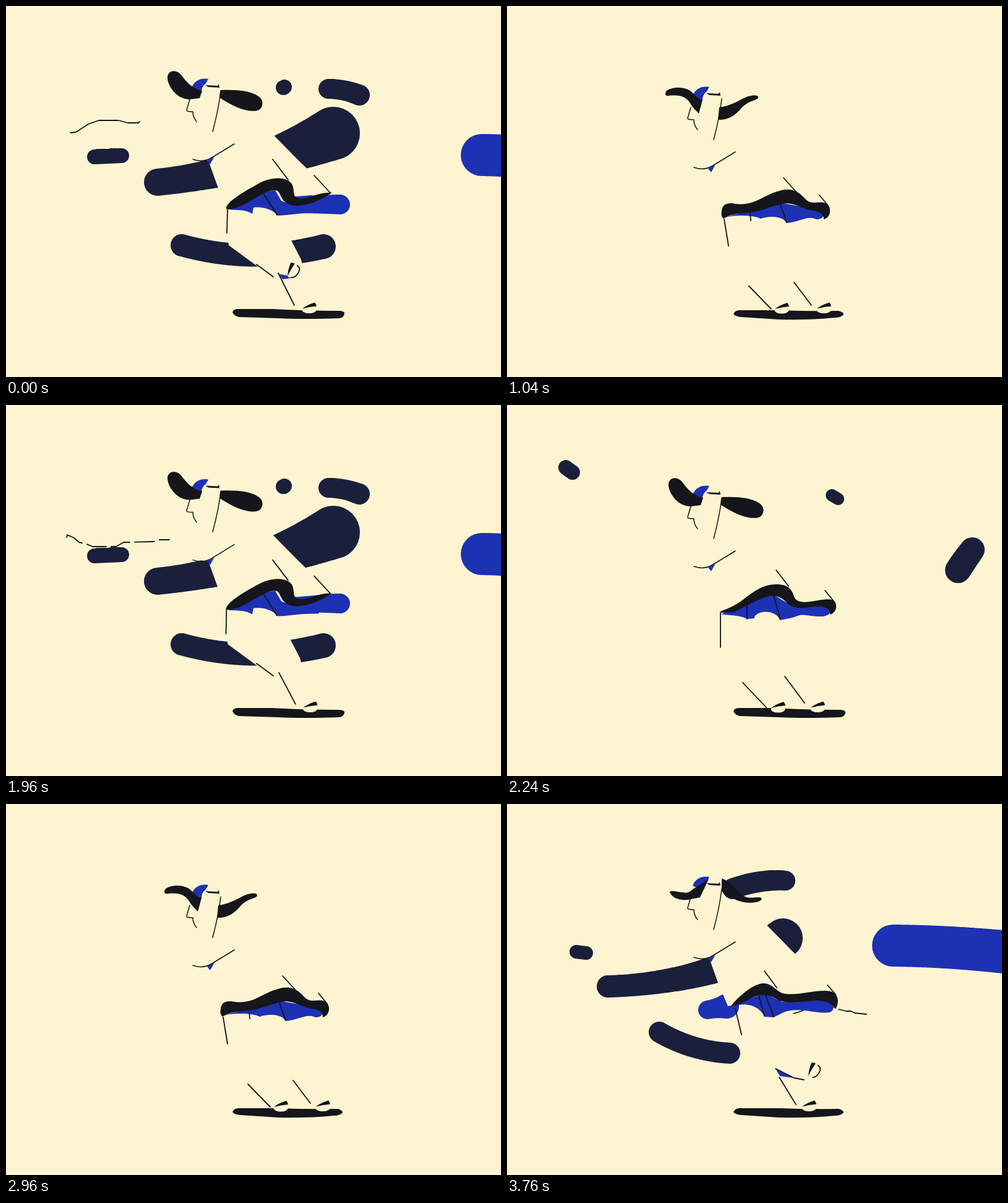
Recreate the animation shown at these times as an HTML page with a canvas. Size 800 by 600 pixels, loop 3.8 s.

```html
<!DOCTYPE html>
<html lang="en">
<head>
<meta charset="utf-8">
<title>Skater</title>
<style>
html, body { margin: 0; height: 100%; overflow: hidden; background: #fff4d1; }
canvas { display: block; }
</style>
</head>
<body>
<canvas id="stage" width="800" height="600"></canvas>
<script>
const ctx = document.getElementById('stage').getContext('2d');
const CREAM = '#fff4d1', NAVY = '#1a203b', BLUE = '#1d31b5', INK = '#15151b';
const STEP = 40, LOOP = 3800, CYCLE = 48;

// Value of keys [[step, ...numbers], ...] at a step, or null outside them.
function at(keys, step) {
  const i = keys.findIndex((k, n) => n + 1 < keys.length && step >= k[0] && step <= keys[n + 1][0]);
  if (i < 0) return null;
  const a = keys[i], b = keys[i + 1], p = (step - a[0]) / (b[0] - a[0]);
  return a.slice(1).map((v, n) => v + (b[n + 1] - v) * p);
}
const cyclic = (keys, step) => at(keys, step) || at(keys, step + CYCLE);

function fill(path, color) {
  ctx.fillStyle = color;
  ctx.fill(new Path2D(path));
}
function line(path, width = 1.8) {
  ctx.strokeStyle = INK;
  ctx.lineWidth = width;
  ctx.stroke(new Path2D(path));
}
const segment = s => s && line(`M${s[0]} ${s[1]}L${s[2]} ${s[3]}`);
function shifted(dx, dy, draw) {
  ctx.save();
  ctx.translate(dx, dy);
  draw();
  ctx.restore();
}

// Gusts: step, tail x y r, bend x y, head x y r
const gusts = [
  [NAVY, [[38, 70, 300, 0, 75, 300, 80, 300, 0], [41, 85, 299, 13, 120, 305, 170, 292, 16],
    [46, 163, 295, 18, 330, 290, 446, 217, 32], [48, 245, 285, 22, 390, 270, 529, 206, 43],
    [52, 570, 255, 28, 640, 240, 700, 225, 36], [56, 729, 267, 21, 740, 250, 752, 234, 20],
    [59, 785, 215, 0, 785, 215, 785, 215, 0]]],
  [NAVY, [[39, 110, 310, 0, 115, 315, 120, 320, 0], [46, 246, 369, 17, 300, 400, 360, 403, 17],
    [48, 284, 387, 18, 395, 418, 513, 389, 20], [54, 700, 350, 0, 710, 350, 720, 350, 0]]],
  [NAVY, [[34, 98, 165, 0, 98, 165, 98, 165, 0], [36, 108, 184, 14, 115, 196, 122, 209, 15],
    [46, 365, 137, 17, 410, 121, 450, 124, 16], [48, 521, 134, 16, 545, 134, 571, 144, 17],
    [53, 770, 190, 0, 770, 190, 770, 190, 0]]],
  [NAVY, [[45, 400, 132, 0, 400, 132, 400, 132, 0], [48, 448, 132, 12, 449, 132, 450, 131, 12],
    [56, 525, 146, 10, 530, 149, 535, 152, 10], [60, 590, 175, 0, 590, 175, 590, 175, 0]]],
  [NAVY, [[44, 105, 238, 0, 105, 238, 105, 238, 0], [46, 112, 239, 11, 120, 240, 128, 241, 11],
    [48, 143, 244, 12, 165, 243, 187, 242, 12], [53, 400, 240, 0, 405, 240, 410, 240, 0]]],
  [NAVY, [[6, 92, 99, 0, 92, 99, 92, 99, 0], [8, 95, 101, 12, 100, 105, 106, 109, 12],
    [16, 446, 221, 16, 480, 226, 522, 223, 16], [22, 770, 190, 0, 775, 190, 780, 190, 0]]],
  [NAVY, [[18, 80, 130, 0, 80, 130, 80, 130, 0], [20, 82, 130, 13, 95, 132, 112, 136, 13],
    [22, 330, 180, 16, 410, 190, 500, 185, 16], [25, 790, 200, 0, 790, 200, 790, 200, 0]]],
  [BLUE, [[28, 20, 330, 0, 20, 330, 20, 330, 0], [30, 90, 335, 14, 140, 340, 190, 330, 14],
    [34, 740, 290, 0, 745, 290, 750, 290, 0]]],
  [BLUE, [[34, -160, 140, 25, -110, 140, -60, 160, 20], [36, -80, 172, 25, 35, 170, 111, 251, 23],
    [40, 0, 20, 24, 100, 260, 420, 220, 30], [46, 624, 229, 34, 740, 230, 880, 248, 36],
    [48, 769, 241, 34, 840, 242, 920, 255, 36], [51, 960, 255, 34, 970, 255, 980, 255, 36]]],
  [BLUE, [[33, 20, 325, 0, 20, 325, 20, 325, 0], [36, 41, 334, 16, 60, 335, 79, 337, 16],
    [46, 324, 333, 15, 340, 330, 355, 327, 20], [48, 470, 321, 14, 500, 321, 540, 321, 16],
    [54, 730, 300, 0, 730, 300, 730, 300, 0]]]
];

function drawGust(color, keys, step) {
  const g = cyclic(keys, step);
  if (!g) return;
  const [x0, y0, r0, bx, by, x1, y1, r1] = g;
  ctx.fillStyle = color;
  ctx.beginPath();
  for (let i = 0; i <= 100; i++) {
    const p = i / 100, q = 1 - p;
    const x = q * q * x0 + 2 * p * q * bx + p * p * x1;
    const y = q * q * y0 + 2 * p * q * by + p * p * y1;
    const r = r0 + (r1 - r0) * p * p;
    ctx.moveTo(x + r, y);
    ctx.arc(x, y, r, 0, 7);
  }
  ctx.fill();
}

// Four flapping drawings: left hair, right hair
const hair = [
  ['M317 137C300 133 292 123 285 114C277 102 263 103 261 114C260 128 275 151 297 151L313 149Z',
    'M347 136C375 135 395 137 408 146C417 152 416 163 409 168C395 174 370 165 345 148Z'],
  ['M316 139C308 137 303 130 296 124C285 117 267 118 258 124C253 131 258 133 262 132C282 130 290 135 296 144C300 152 306 156 310 161Z',
    'M343 151C365 148 378 137 390 133C398 131 407 130 406 136C400 141 390 140 378 153C368 165 356 172 341 171Z'],
  ['M317 129C300 126 282 127 269 139C262 146 262 160 270 162C284 164 296 152 313 153Z',
    'M345 143C366 145 376 131 390 125C402 120 413 123 411 134C407 148 390 162 375 161C363 161 353 157 344 154Z'],
  ['M326 121L300 138C294 144 290 144 284 143C275 142 266 139 263 142C266 152 278 156 292 155L312 151Z',
    'M347 120C362 126 372 143 385 150C395 154 409 148 412 153C410 161 385 162 370 155C358 149 350 145 347 141Z']
];

// Shirt hem: height of the body it belongs to, lining, band, creases
const hemPush = [0,
  'M360 329C385 320 410 300 435 298L445 315L465 323L520 306L505 335C480 334 460 338 440 339C430 328 412 324 400 326L398 336C385 328 372 331 360 329Z',
  'M356 328C354 318 385 300 405 289C430 274 457 276 463 290C467 300 462 309 474 311C490 313 505 300 527 302C510 313 490 323 468 323C446 321 446 308 440 300C430 292 405 310 390 318C376 326 360 331 356 328Z',
  'M431 248L456 281M498 274L524 302M416 303L438 338'];
const hems = [
  [13,
    'M346 338C370 330 400 310 430 306L460 325L515 322C528 328 526 340 510 342C490 343 480 337 470 341C460 345 450 346 441 348C436 333 410 330 400 342L400 345L388 346C375 339 360 341 346 338Z',
    'M344 336C345 331 358 332 380 316C400 300 415 290 435 290C452 290 459 296 463 307C466 318 474 320 490 318C505 316 520 312 528 316C535 322 533 336 522 339C524 330 512 324 495 326C478 329 462 330 452 320C445 311 432 306 420 310C400 316 380 330 365 335Z',
    'M435 267L455 293M514 300L527 316M388 323L388 346M431 308L442 347'],
  [13,
    'M350 343C370 334 400 334 440 318L480 325L505 330C514 335 514 345 500 345C485 338 472 350 452 351C445 338 420 340 410 344C400 338 365 337 350 343Z',
    'M347 332C347 320 358 317 370 320C400 324 415 305 440 299C462 292 474 303 482 312C492 322 500 316 512 318C526 321 525 342 512 345C512 332 500 332 488 330C470 324 460 317 445 320C420 326 405 334 385 335C368 336 358 338 350 344C346 340 346 336 347 332Z',
    'M447 278L477 311M505 306L519 323M393 336L394 347M441 319L452 350'],
  [10,
    'M356 340C368 322 390 328 402 335L450 323C480 316 497 333 500 345C485 351 465 350 455 345C448 330 430 340 418 347L400 347C390 330 372 332 356 340Z',
    'M354 334C355 320 368 307 384 310C400 314 410 323 425 319C445 312 458 301 478 302C494 305 505 317 516 334C514 340 508 343 500 344C490 333 470 320 455 324C435 330 420 337 405 335C388 330 370 322 356 338Z',
    'M469 283L492 306M381 299L388 309M399 337L401 350M448 327L457 346'],
  [0,
    'M364 328C380 322 400 308 420 308L445 320L500 316C525 316 535 330 522 337C500 340 470 327 447 337L431 345L416 344C410 330 390 318 364 328Z',
    'M361 328C368 318 390 296 408 291C425 286 432 300 445 306C465 311 490 302 515 302C535 302 539 318 531 332C528 326 520 318 500 318C480 318 460 324 440 318C425 308 410 306 395 314C385 320 370 326 361 328Z',
    'M416 270L436 297M518 293L531 308M407 310L416 343M418 309L431 344']
];

const boards = [
  'M366 495Q368 490 375 490L430 490Q480 493 540 493Q548 494 547 498Q545 505 538 505Q480 507 440 505L376 503Q368 501 366 495Z',
  'M366 498Q369 491 378 492L440 492Q490 494 536 493Q544 495 544 499Q540 504 530 504Q490 508 440 507L378 503Q368 502 366 498Z'
];

const bodyDrop = [[0, 0], [5, 13], [34, 13], [46, 0], [48, 0]];
const knee = [[0, 358, 328, 357, 367], [8, 345, 337, 345, 392], [17, 349, 339, 353, 385],
  [26, 351, 345, 358, 388], [37, 355, 340, 363, 377], [46, 369, 331, 379, 373], [48, 358, 328, 357, 367]];
const standShin = [[0, 440, 432, 466, 484], [8, 449, 439, 481, 482], [17, 457, 439, 488, 486],
  [26, 464, 447, 492, 484], [37, 470, 447, 498, 487], [46, 440, 442, 467, 486], [48, 440, 432, 466, 484]];
const pushShin = [[48, 405, 418, 432, 438], [50, 405, 418, 432, 438], [56, 381, 449, 419, 489],
  [65, 390, 454, 424, 490], [74, 391, 453, 427, 490], [85, 400, 455, 433, 490], [88, 425, 450, 462, 492]];
const standFoot = [[0, 490], [8, 502], [17, 507], [26, 512], [37, 516], [46, 488], [48, 490]];
const pushFoot = [[5, 430, 470, -20], [8, 438, 491, 0], [17, 441, 491, 0], [26, 444, 491, 0], [37, 452, 491, 0],
  [40, 495, 494, -5], [43, 540, 462, -50], [46, 495, 432, -50], [48, 463, 429, -50]];
const cuff = [[45, 434, 428, 441, 440, 464, 443], [46, 434, 428, 441, 440, 464, 443], [48, 440, 433, 447, 442, 468, 439]];

function drawFoot(x, y, degrees) {
  ctx.save();
  ctx.translate(x, y);
  ctx.rotate(degrees * Math.PI / 180);
  ctx.fillStyle = CREAM;
  ctx.beginPath();
  ctx.ellipse(0, 1, 11.5, 5.5, 0, 0, 7);
  ctx.fill();
  if (degrees) line('M12 0C13 11 -4 11 -8 6');
  fill('M-11 -1Q-4 -7 9 -11Q11 -9 12 -5Q0 -4 -11 -1Z', INK);
  ctx.restore();
}

function drawHead(d) {
  fill('M300 132C305 120 315 116 327 118L323 125C318 129 316 133 316 140Z', BLUE);
  hair[d].forEach(path => fill(path, INK));
  fill('M322 128L342 129L344 126L345 132L327 131Z', INK);
  line('M297 151L292 168Q291 171 302 171Q302 180 308 187M347 137Q344 165 334 203', 1.5);
  line('M302 248Q318 254 333 245L369 223', 1.5);
  fill('M325 250L330 256L337 243Z', BLUE);
}

// Wind lines: path, then steps of start, full, breaking up, end
const swirl = 'M98 214L99 210L110 215L118 222L128 224L140 229L178 229L190 222L238 221L248 218L264 218';
const winds = [
  ['M104 205L113 204L133 191L150 185L182 185L197 189L214 189L216 187', -5, 0, 1, 6],
  [swirl, 41, 46, 48, 53],
  [swirl, 78, 84, 87, 91],
  ['M420 343L447 343L470 337L487 331L507 330L531 328M536 332L548 335L556 335L562 338L572 339L581 340', 88, 93, 94, 99]
];
function drawWind([path, start, full, breaking, end], step) {
  if (step < start || step >= end) return;
  const broken = Math.max(0, (step - breaking) / (end - breaking));
  if (step < full) ctx.setLineDash([180 * (step - start) / (full - start), 999]);
  else if (broken) ctx.setLineDash([40 * (1 - broken), 40 * broken]);
  line(path);
  ctx.setLineDash([]);
}

function draw(now) {
  const tick = Math.floor((now % LOOP) / STEP);
  const step = tick % CYCLE, held = step - step % 2;
  const d = held / 2 % 4;
  const [drop] = at(bodyDrop, step);
  const leg = at(knee, step);

  ctx.fillStyle = CREAM;
  ctx.fillRect(0, 0, 800, 600);
  gusts.forEach(([color, keys]) => drawGust(color, keys, held));
  winds.forEach(wind => drawWind(wind, tick));

  // The body is paper coloured and hides the gusts behind it
  shifted(0, drop, () => fill('M316 125L347 125L345 150L414 190L472 249L500 276L527 303L445 310L357 327L341 289L327 250L305 248L307 187L292 170L298 150Z', CREAM));
  shifted(leg[2] - 357, 0, () => fill('M358 327L357 367L360 387L405 420L432 438L466 484L492 484L477 410L463 383L440 338L440 315Z', CREAM));

  const hem = step < 2 ? hemPush : hems[d];
  shifted(0, drop - hem[0], () => {
    fill(hem[1], BLUE);
    fill(hem[2], INK);
    line(hem[3]);
  });
  shifted(0, drop, () => drawHead(d));

  fill(boards[d ? 1 : 0], INK);
  segment(leg);
  segment(at(standShin, step));
  segment(cyclic(pushShin, step));
  const c = cyclic(cuff, step);
  if (c) {
    fill(`M${c[0]} ${c[1]}L${c[2]} ${c[3]}L${c[4]} ${c[5]}Z`, BLUE);
    if (step) line(`M${c[0]} ${c[1]}L${c[4]} ${c[5]}L480 446`);
  }
  const foot = cyclic(pushFoot, step);
  if (foot) drawFoot(...foot);
  drawFoot(at(standFoot, step)[0], 490.5, 0);
}

ctx.lineCap = ctx.lineJoin = 'round';
(function frame() {
  draw(performance.now());
  requestAnimationFrame(frame);
})();
</script>
</body>
</html>
```
